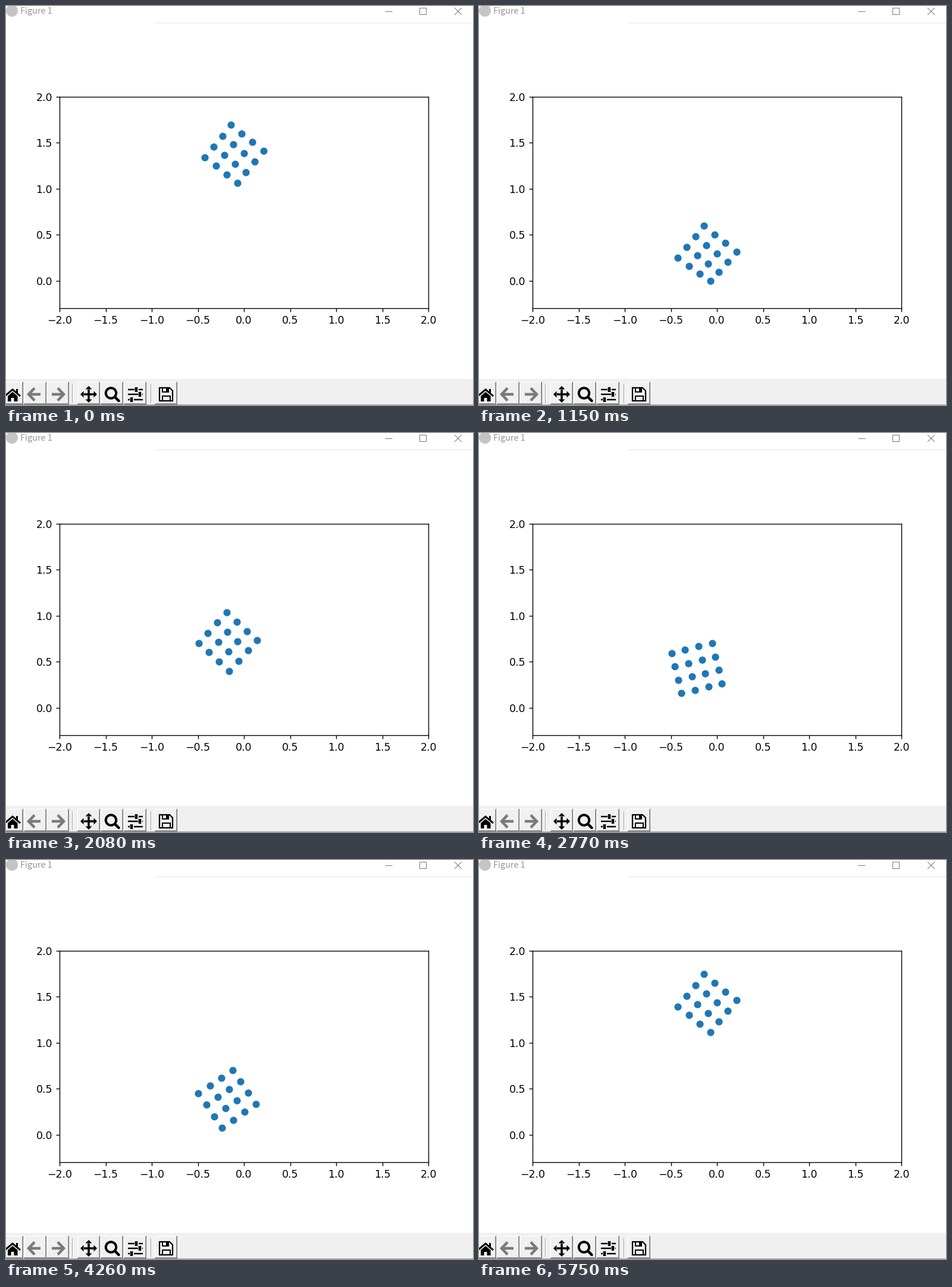
Recreate the animation shown at these times as a matplotlib script. Size 785 by 672 pixels, loop 5.83 s.

```python
import numpy as np
import matplotlib.pyplot as plt
from matplotlib.animation import FuncAnimation
from matplotlib.patches import Circle, Polygon, Rectangle

W, H, DPI = 785, 672, 125
LOOP, TICK = 5830, 22          # ms
STEP, LEAD, LAST = 77.75, 49, 74
PX = 72 / DPI                  # points per pixel

# Body and motion, in pixels and steps
GAP, FLOOR = 23.25, 463
TOP, FALL = 238.8, 0.46        # release height, half the gravity
AGE, RESTART = 4.8, 71.6       # steps already fallen at start, next release
LIFT, DRAG, DENT = 0.495, 0.16, 5.7

# floor contacts: step, x, angle
HITS = np.array([
    (15, 383.5, 38.7),
    (38.5, 364.3, -118),
    (51.3, 363.9, -43.5),
    (62.5, 386, -19),
    (69, 390, 30),
    (75, 392, 36),
])

fig = plt.figure(figsize=(W / DPI, H / DPI), dpi=DPI, facecolor="white")

ax = fig.add_axes([90.1 / W, 162.75 / H, 620 / W, 356.5 / H])
ax.set(xlim=(-2, 2), ylim=(-0.3, 2),
       xticks=np.arange(-2, 2.1, 0.5), yticks=np.arange(0, 2.1, 0.5))

# Overlay whose coordinates are stage pixels, y down
ui = fig.add_axes([0, 0, 1, 1], facecolor="none")
ui.set(xlim=(0, W), ylim=(H, 0))
ui.axis("off")


def line(pts, width=1.0, color="black", cap="butt"):
    x, y = zip(*pts)
    ui.plot(x, y, color=color, lw=width * PX, solid_capstyle=cap,
            solid_joinstyle="miter")


def box(x0, y0, x1, y1, color="black"):
    ui.add_patch(Rectangle((x0, y0), x1 - x0, y1 - y0, fc=color, ec="none"))


def poly(pts, color="black"):
    ui.add_patch(Polygon(pts, fc=color, ec="none"))


def title_bar():
    ui.add_patch(Circle((10, 8), 10, fc="#c4c4c4", ec="none"))
    ui.text(24.5, 13.5, "Figure 1", fontname="Noto Sans CJK JP",
            size=14.3 * PX, color="#999490", va="baseline")
    grey = "#777777"
    line([(637, 9), (649, 9)], 1, grey)
    line([(695, 3), (706, 3), (706, 14), (695, 14), (695, 3)], 1, grey)
    line([(754, 3), (766, 15)], 1, grey)
    line([(754, 15), (766, 3)], 1, grey)
    box(250, 28, W, 29, "#e3e3e3")


def button(x):
    box(x, 633, x + 38, 671, "#6d6d6d")
    box(x, 633, x + 37, 670, "#ffffff")
    box(x + 1, 634, x + 37, 670, "#a6a6a6")
    box(x + 1, 634, x + 36, 669, "#f0f0f0")


def arrow(cx, d):
    grey = "#7a7a7a"
    line([(cx - 9 * d, 654), (cx + 12 * d, 654)], 4.5, grey)
    line([(cx + d, 643.5), (cx + 11 * d, 654), (cx + d, 664.5)], 4.5, grey)


def home():
    line([(-2, 657), (11, 646), (24, 657)], 3)
    poly([(3, 657), (11, 650), (19.5, 657), (19.5, 666), (13.5, 666),
          (13.5, 660), (8.5, 660), (8.5, 666), (3, 666)])
    box(17, 645, 20, 652)


def pan(cx, cy):
    for dx, dy in ((1, 0), (-1, 0), (0, 1), (0, -1)):
        bx, by = cx + 8.5 * dx, cy + 8.5 * dy
        line([(cx, cy), (bx, by)], 3.5)
        poly([(cx + 14 * dx, cy + 14 * dy),
              (bx - 5.5 * dy, by + 5.5 * dx),
              (bx + 5.5 * dy, by - 5.5 * dx)])


def zoom():
    ui.add_patch(Circle((176.5, 652), 8.7, fc="none", ec="black", lw=4 * PX))
    line([(183, 658.5), (189.5, 665)], 4.5, cap="round")


def sliders():
    for y, knob in ((646, 219), (654, 225), (663, 211)):
        line([(205, y), (230, y)], 2.4)
        line([(knob - 3.5, y), (knob + 3.5, y)], 6, "#f0f0f0")
        line([(knob, y - 3.7), (knob, y + 3.7)], 4.5)


def save():
    line([(258, 643), (275, 643), (280, 648), (280, 665), (258, 665),
          (258, 642)], 2.2)
    line([(263, 643), (263, 650), (273, 650), (273, 643)], 2)
    box(269, 643, 273, 650)
    line([(262.5, 665), (262.5, 657), (275.5, 657), (275.5, 665)], 2)


def toolbar():
    box(0, 628, W, H, "#f0f0f0")
    box(0, 671, W, H, "#a0a0a0")
    for x in (-9, 30, 68, 120, 159, 198, 250):
        button(x)
    for x in (111, 243):
        box(x, 637, x + 1, 669, "#a0a0a0")
        box(x + 1, 637, x + 2, 669, "#ffffff")
    home()
    arrow(49, -1)
    arrow(86, 1)
    pan(139, 654)
    zoom()
    sliders()
    save()


def contact(i):
    """Centre and angle at a hit; each hit dents half as deep as the last."""
    _, x, angle = HITS[i]
    a = np.radians(angle)
    reach = 1.5 * GAP * (abs(np.cos(a)) + abs(np.sin(a)))
    return np.array([x, FLOOR - reach + DENT / 2 ** i, a])


def pose(step):
    if step < HITS[0, 0] or step > RESTART:
        age = step - RESTART if step > RESTART else step + AGE
        x, _, angle = contact(0)
        return x, TOP + FALL * age ** 2, angle
    i = np.searchsorted(HITS[:, 0], step, "right") - 1
    span = HITS[i + 1, 0] - HITS[i, 0]
    u = (step - HITS[i, 0]) / span
    u += DRAG * u * (1 - u)
    x, y, angle = contact(i) * (1 - u) + contact(i + 1) * u
    return x, y - LIFT * u * (1 - u) * span ** 2, angle


def body(step):
    cx, cy, angle = pose(step)
    u, v = (np.mgrid[0:4, 0:4].reshape(2, -1) - 1.5) * GAP
    c, s = np.cos(angle), np.sin(angle)
    x, y = cx + u * c - v * s, cy + u * s + v * c
    # the floor pushes the lowest dot up and drags its neighbours along
    low = y.argmax()
    depth = max(y[low] - FLOOR, 0)
    reach = np.hypot(x - x[low], y - y[low]) / GAP
    return x, np.minimum(y - depth * 0.5 ** reach, FLOOR)


def update(k):
    step = min(int((k * TICK + LEAD) / STEP), LAST)
    dots.set_data(*body(step))
    return [dots]


title_bar()
toolbar()
dots, = ui.plot([], [], "o", ms=6, color="#1f77b4")

anim = FuncAnimation(fig, update, frames=LOOP // TICK, interval=TICK,
                     repeat=True, repeat_delay=0)
plt.show()
```
